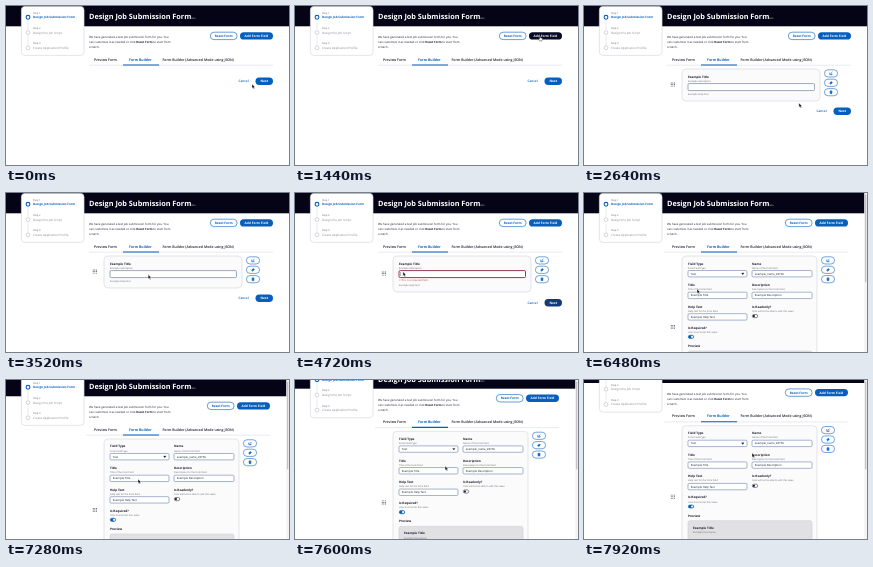
These frames come from a looping animation (283x159 px, 8 s). An HTML page:

```html
<!DOCTYPE html>
<html lang="en">
<meta charset="utf-8">
<title>Design Job Submission Form</title>
<style>
html, body { margin: 0; height: 100%; overflow: hidden; background: #fff }
svg { display: block; width: 100vw; height: 100vh }
text { font-family: "Open Sans", "Noto Sans", sans-serif; text-rendering: geometricPrecision }
</style>
<svg id="stage" viewBox="0 0 283 159"></svg>
<script>
const LOOP = 8000, INK = '#17172b', GRAY = '#62626e', BLUE = '#075fbd', NAVY = '#060a25';

const text = (x, y, s, size = 2.9, fill = INK, weight = 400, anchor = 'start') =>
  `<text x="${x}" y="${y}" font-size="${size}" fill="${fill}" font-weight="${weight}" text-anchor="${anchor}">${s}</text>`;
const rect = (x, y, w, h, r, fill, stroke = 'none', sw = .6, more = '') =>
  `<rect x="${x}" y="${y}" width="${w}" height="${h}" rx="${r}" fill="${fill}" stroke="${stroke}" stroke-width="${sw}" ${more}/>`;
const path = (d, stroke, sw = .6, fill = 'none') =>
  `<path d="${d}" fill="${fill}" stroke="${stroke}" stroke-width="${sw}"/>`;
const group = (id, body) => `<g id="${id}">${body}</g>`;

const pill = (x, y, w, h, label, solid, id = '') =>
  rect(x, y, w, h, h / 2, solid ? BLUE : '#fff', solid ? 'none' : BLUE, .6, id && `id="${id}"`) +
  text(x + w / 2, y + h / 2 + 1.1, label, 3.2, solid ? '#fff' : BLUE, 700, 'middle');

const step = (n, y, label, on) =>
  text(27, y - 3.6, 'Step ' + n, 2.6, GRAY) +
  `<circle cx="22" cy="${y}" r="1.9" fill="#fff" stroke="${on ? BLUE : '#b9bac4'}" stroke-width="${on ? 1.1 : .6}"/>` +
  text(27, y + 1, label, 3, on ? BLUE : '#858592', on ? 700 : 400);

const field = (x, y, w, title, note, value) =>
  text(x, y, title, 3.1, INK, 700) + text(x, y + 4.1, note, 2.4, GRAY) +
  (value ? rect(x, y + 6, w, 6.4, 1.2, '#fff', '#4a6a9c', .5) + text(x + 2.8, y + 10.2, value, 2.8) : '');

const toggle = (x, y, on) =>
  rect(x, y, 5.4, 3.2, 1.6, on ? BLUE : '#fff', on ? BLUE : INK, .5) +
  `<circle cx="${x + (on ? 3.8 : 1.6)}" cy="${y + 1.6}" r="1.1" fill="${on ? '#fff' : INK}"/>`;

const grip = y => [0, 1.6, 3.2].map(dx => [0, 1.6, 3.2].map(dy =>
  rect(86.8 + dx, y - 2 + dy, .9, .9, .2, '#55555f')).join('')).join('');

const icons = [
  'M-1.2-.8V1.3H1V.2M-.3.3L1.4-1.4',
  'M-1.3.5L.3-1.2L1.3-.2L-.3 1.3Z',
  'M-1.2-1H1.2M-.8-1V1.4H.8V-1M-.4-1.5H.4'
];
const tools = icons.map((d, i) => `<g transform="translate(247 ${67.4 + i * 9.4})">` +
  rect(-6.6, -3.6, 13.2, 7.2, 3.6, '#fff', BLUE, .55) + path(d, BLUE, .7, i ? BLUE : 'none') + '</g>').join('');

const card = (w, h) => rect(98, 63, w, h, 4, '#fbfbfc', '#d5d6dd', .6);

const small = error =>
  card(138, error ? 36 : 32) + grip(error ? 80.5 : 78.5) +
  text(104, 71.7, 'Example Title', 3.1, INK, 700) +
  text(104, 75.9, 'Example description', 2.4, GRAY) +
  rect(104, 77.6, 126.5, 7, 1.2, '#fff', error ? '#8c2440' : '#5c6f93', error ? .9 : .6) +
  (error ? path('M105.6 79V83', INK, .35) + text(104, 88.3, '× This is a required field.', 2.6, '#c2413b') : '') +
  text(104, error ? 92.7 : 88.9, 'Example Help Text', 2.4, GRAY);

const large =
  card(135, 142) + grip(134) +
  field(104, 71.5, 59, 'Field Type', 'Form Field Type', 'Text') +
  path('M157.6 80L158.8 81.7L160 80Z', INK, .3, INK) +
  field(168, 71.5, 60, 'Name', 'Name of the form field', 'example_name_28736') +
  field(104, 93.2, 59, 'Title', 'Title of the form field', 'Example Title') +
  field(168, 93.2, 60, 'Description', 'Description for the form field', 'Example Description') +
  field(104, 114.7, 59, 'Help Text', 'Help text for the form field', 'Example Help Text') +
  field(168, 114.7, 60, 'Is Readonly?', 'User will not be able to edit this value') +
  toggle(168.3, 121.5, false) +
  field(104, 135.8, 59, 'Is Required?', 'User must enter this value') +
  toggle(104.3, 142.2, true) +
  text(104, 154, 'Preview', 3.1, INK, 700) +
  rect(104, 158, 124, 40, 2, '#e1e1e4', '#cfcfd5') +
  text(109, 166, 'Example Title', 3.1, INK, 700) +
  text(109, 170.2, 'Example Description', 2.4, GRAY);

stage.innerHTML = group('page',
  rect(0, 0, 283, 20.3, 0, '#040416') +
  text(83, 13.2, 'Design Job Submission Form', 7.3, '#fff', 700) +
  text(184, 13.2, 'Beta', 2.6, '#b9bac4') +
  rect(15.4, .4, 62.6, 49, 3.5, '#fff', '#d9dae1', .7) +
  path('M22 14V24M22 29.5V39.5', '#d3d4dc', .5) +
  step(1, 11.3, 'Design Job Submission Form', true) +
  step(2, 26.6, 'Design the Job Script') +
  step(3, 41.8, 'Create Application Profile') +
  text(83, 32.3, 'We have generated a test job submission form for you. You') +
  text(83, 37.3, 'can customize it as needed or click <tspan font-weight="700">Reset Form</tspan> to start from') +
  text(83, 42.3, 'scratch.') +
  text(88, 54.7, 'Preview Form', 3.5, INK, 600) +
  text(123, 54.7, 'Form Builder', 3.5, BLUE, 700) +
  text(156.5, 54.7, 'Form Builder (Advanced Mode using JSON)', 3.5, INK, 600) +
  group('rule', path('M83 59.2H267', '#d3d4dc', .5)) +
  path('M117 59H153', BLUE, 1.1) +
  group('actions', pill(204.3, 26.2, 26.8, 7.4, 'Reset Form') + pill(234, 26.2, 33, 7.4, 'Add Form Field', true, 'add')) +
  group('blank', small(false)) + group('invalid', small(true)) + group('editor', large) +
  group('tools', tools) +
  group('footer', text(237.5, 76.3, 'Cancel', 3.2, BLUE, 600, 'middle') + pill(249.5, 71.6, 17.5, 7.4, 'Next', true, 'next'))
) + group('bar', rect(280.2, 0, 2.8, 159, 0, '#f4f4f5') + rect(280.9, 1.5, 1.4, 88, .7, '#c4c4c8')) +
  group('arrow', path('M0 0V4.4L1.1 3.5L1.8 5L2.6 4.6L1.9 3.2H3.2Z', '#fff', .4, '#111')) +
  group('hand', path('M-.5 2.5V.3Q0-.4.5.3V1.8L2.2 2.2Q2.6 2.4 2.4 3.4L1.9 4.9H-.4L-1.7 3Q-1.5 2.3-.5 3Z', '#111', .4, '#fff'));

const pointer = [[0, 246, 78], [160, 246, 78], [400, 247, 74], [560, 247, 70], [1360, 245, 30], [2400, 245, 30],
  [2640, 215, 97], [3200, 160, 82], [3920, 120, 81], [4300, 106, 78], [4960, 109, 79], [5200, 220, 71],
  [5440, 246, 67], [6200, 246, 67], [6480, 113, 96], [6640, 113, 96], [6800, 132, 99], [7360, 132, 99],
  [7840, 168, 73], [8000, 168, 73]];
const scroll = [[0, 0], [6900, 0], [7280, 4], [7840, 17.3], [8000, 17.3]];

function at(keys, t) {
  const i = keys.findIndex(k => k[0] > t), a = keys[i - 1], b = keys[i];
  const u = (t - a[0]) / (b[0] - a[0]);
  return a.slice(1).map((v, j) => v + (b[j + 1] - v) * u);
}
const $ = id => document.getElementById(id);
const show = (id, on) => $(id).setAttribute('visibility', on ? 'visible' : 'hidden');
const move = (id, x, y) => $(id).setAttribute('transform', `translate(${x} ${y})`);

function draw() {
  const t = performance.now() % LOOP;
  const added = t >= 2000, invalid = t >= 4400 && t < 6240, open = t >= 6240;
  const [x, y] = at(pointer, t), shift = open ? -3 : 0;
  const onAdd = t > 1200 && t < 2440, onEdit = t > 5300 && t < 6220;

  show('blank', added && !invalid && !open);
  show('invalid', invalid);
  show('editor', open);
  show('tools', added);
  show('bar', open);
  show('hand', onAdd || onEdit);
  show('arrow', !onAdd && !onEdit);
  move('page', 0, -at(scroll, t)[0]);
  move('actions', shift, 0);
  move('tools', shift, 0);
  move('rule', shift, 0);
  move('footer', 0, open ? 140 : invalid ? 34.5 : added ? 30 : 0);
  move('arrow', x, y);
  move('hand', x, y);
  $('add').setAttribute('fill', onAdd ? NAVY : BLUE);
  $('next').setAttribute('fill', invalid ? '#123a7c' : BLUE);
  requestAnimationFrame(draw);
}
draw();
</script>
</html>
```
